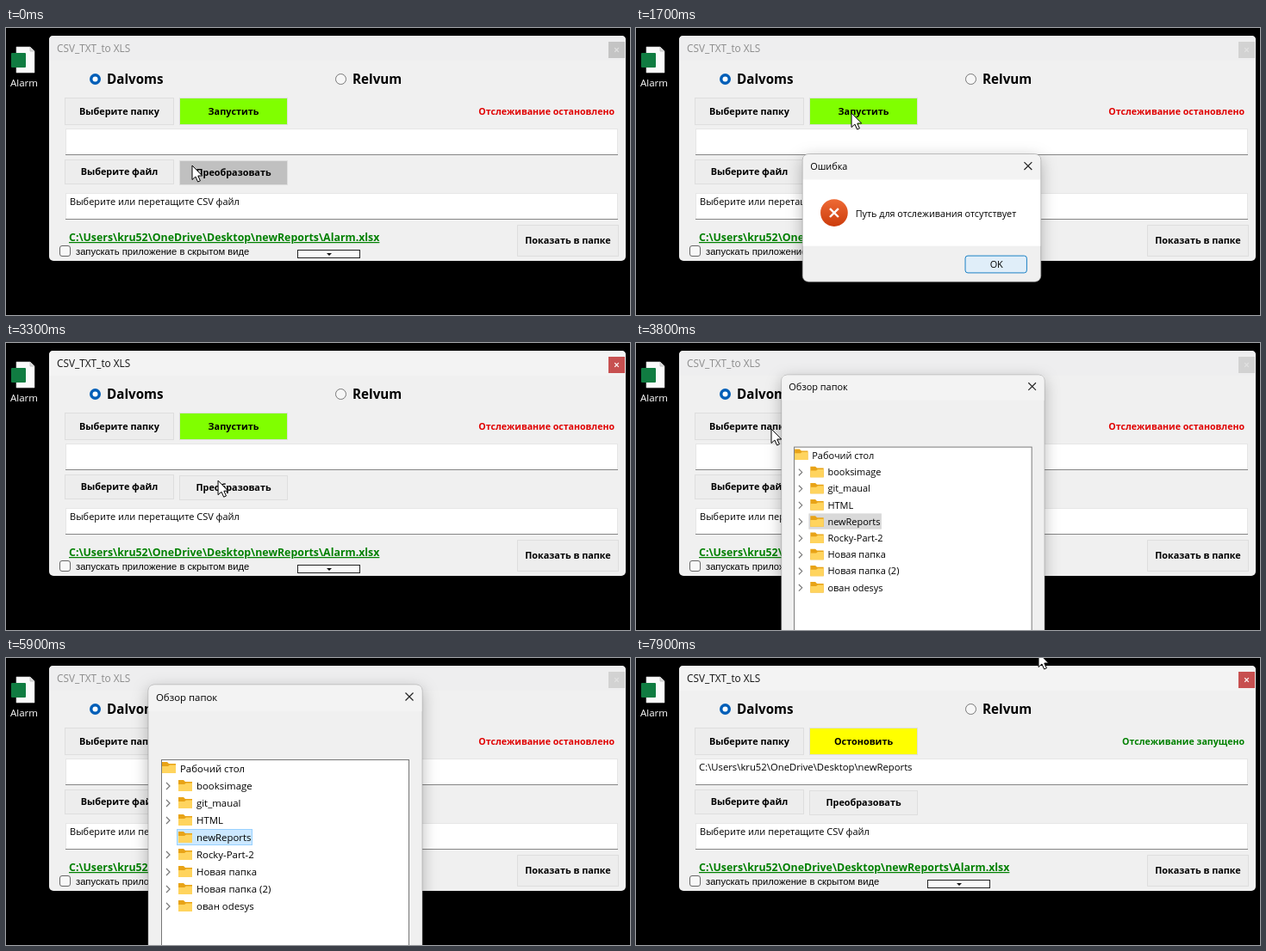
Write an HTML page that moves like this. It is 724 px wide and 334 px high and loops after 8000 ms.

```html
<!DOCTYPE html>
<html lang="ru">
<head>
<meta charset="utf-8">
<style>
html, body { margin: 0; width: 100%; height: 100%; overflow: hidden; background: #000; }
svg { display: block; font-family: "Open Sans", "Noto Sans", sans-serif; white-space: pre; }
.b { font-weight: 700; }
.m { text-anchor: middle; }
.e { text-anchor: end; }
.plain { font-family: "Liberation Sans", sans-serif; }
#error, #browse { filter: drop-shadow(0 5px 9px #0004); }
#tip { filter: drop-shadow(2px 2px 1px #0006); }
</style>
</head>
<body>
<svg id="stage" width="724" height="334" viewBox="0 0 724 334"></svg>
<script>
const stage = document.getElementById('stage');
const rect = (x, y, w, h, fill, stroke = 'none', extra = '') =>
  `<rect x="${x}" y="${y}" width="${w}" height="${h}" fill="${fill}" stroke="${stroke}" ${extra}/>`;
const text = (x, y, str, size = 11, cls = '', fill = '#000', extra = '') =>
  `<text x="${x}" y="${y}" font-size="${size}" class="${cls}" fill="${fill}" ${extra}>${str}</text>`;
const path = (d, stroke, width = 1, fill = 'none', extra = '') =>
  `<path d="${d}" stroke="${stroke}" stroke-width="${width}" fill="${fill}" ${extra}/>`;
const button = (x, y, w, h, label, fill = '#ededed', id = '') =>
  rect(x + .5, y + .5, w - 1, h - 1, fill, '#dedede', id && `id="${id}"`) +
  text(x + w / 2, y + h / 2 + 3.6, label, 10.85, 'b m', '#000', id && `id="${id}Text"`);
const field = (y, content) =>
  rect(69.5, y + .5, 640, 30, '#fff', '#e6e6e6') + path(`M69 ${y + 30.5}H710`, '#858585') + content;
const cross = (x, y, r, color, width, extra) =>
  path(`M${x - r} ${y - r}l${2 * r} ${2 * r}m0 ${-2 * r}l${-2 * r} ${2 * r}`, color, width, 'none', extra);
const folder = (x, y) =>
  path(`M${x} ${y}h6l2 2h8v11h-16z`, 'none', 0, '#e8a317') +
  path(`M${x} ${y + 5}h7l2-1.5h7v9.5h-16z`, 'none', 0, '#ffd45e');

const home = 'C:\\Users\\kru52\\OneDrive\\Desktop\\newReports';

const desktop =
  path('M12 22h16l5 5v25h-21z', '#d4d4d4', .6, '#fafafa') + path('M28 22v5h5', '#bbb', .8, '#ddd') +
  rect(6, 29, 17, 17, '#107c41', 'none', 'rx="1"') +
  text(21, 68, 'Alarm', 11.5, 'm', '#fff');

const app =
  rect(50, 9, 669, 262, '#f0f0f0', 'none', 'rx="5"') +
  path('M50 38V14q0-5 5-5H714q5 0 5 5V38z', 'none', 0, '#f0f0f0', 'id="bar"') +
  text(59, 28, 'CSV_TXT_to XLS', 11.8, '', '#111', 'id="title"') +
  rect(699, 16, 19, 19, '#c75050', 'none', 'id="close"') +
  cross(708.5, 25.5, 2.3, '#fff', 1.2, 'id="closeMark"') +
  '<circle cx="103.5" cy="59.5" r="6.5" fill="#005fb8"/><circle cx="103.5" cy="59.5" r="3" fill="#fff"/>' +
  '<circle cx="388.5" cy="59.5" r="6" fill="#f6f6f6" stroke="#777"/>' +
  text(117, 65, 'Dalvoms', 15.2, 'b') + text(402, 65, 'Relvum', 15.2, 'b') +
  button(68, 81, 127, 32, 'Выберите папку') +
  button(201, 81, 126, 32, 'Запустить', '#80ff00', 'start') +
  text(706, 101, '', 10.6, 'b e', '#e00000', 'id="status"') +
  field(117, text(73, 131, home, 11.3, '', '#000', 'id="watched"')) +
  button(68, 153, 127, 29, 'Выберите файл') +
  button(201, 154, 126, 29, 'Преобразовать', '#ededed', 'convert') +
  field(192, text(74, 206, 'Выберите или перетащите CSV файл')) +
  text(73, 248, home + '\\Alarm.xlsx', 12.37, 'b', '#008000', 'text-decoration="underline"') +
  rect(62.5, 253.5, 12, 12, '#f8f8f8', '#666', 'rx="2.5"') +
  text(81, 264, 'запускать приложение в скрытом виде', 11.2, 'plain') +
  rect(338.5, 258.5, 72, 9, '#fafafa', '#222') + path('M372 262h6l-3 3z', 'none', 0, '#111') +
  button(593, 229, 118, 37, 'Показать в папке');

const errorBox = `<g id="error">
  ${rect(192, 146, 279, 150, '#f0f0f0', '#9b9b9b', 'rx="7" stroke-width=".7"')}
  ${path('M192.5 176V153q0-6.5 6.5-6.5H464q6.5 0 6.5 6.5V176z', 'none', 0, '#f3f3f3')}
  ${rect(192.5, 176, 278, 78, '#fff')}
  ${text(201, 165, 'Ошибка')}${cross(456, 160, 4.5, '#222', 1.2)}
  <linearGradient id="red" x2="0" y2="1"><stop stop-color="#ee6a35"/><stop offset="1" stop-color="#cc3c0c"/></linearGradient>
  <circle cx="229" cy="215" r="16" fill="url(#red)"/>${cross(229, 215, 5, '#fff', 2.4)}
  ${text(254, 220, 'Путь для отслеживания отсутствует', 10.9)}
  ${rect(382.5, 265.5, 72, 20, '#e0eef9', '#1a80c4', 'rx="3"')}
  ${text(419, 280, 'OK', 11, 'm')}</g>`;

const names = ['booksimage', 'git_maual', 'HTML', 'newReports', 'Rocky-Part-2', 'Новая папка', 'Новая папка (2)', 'ован odesys'];
const rows = names.map((name, i) => {
  const y = 149 + 20 * i;
  const picked = i === 3;
  return (picked ? rect(198.5, y - 9.5, 87, 18, '#cce8ff', '#99d1ff', 'id="picked"') : '') +
    path(`M186 ${y - 4}l4 4l-4 4`, '#777', 1.2, 'none', picked ? 'id="arrow"' : '') +
    folder(200, y - 7) + text(221, y + 4, name, 11.4);
}).join('');
const browser = `<g id="browse">
  ${rect(165, 31, 318, 400, '#f0f0f0', '#8c8c8c', 'rx="7" stroke-width=".5"')}
  ${path('M165.5 62V38q0-6.5 6.5-6.5H476q6.5 0 6.5 6.5V62z', 'none', 0, '#f3f3f3')}
  ${text(174, 50, 'Обзор папок', 11.4)}${cross(468, 45, 4.5, '#222', 1.2)}
  ${rect(180.5, 118.5, 287, 300, '#fff', '#777')}
  ${folder(181, 121)}${text(202, 132.5, 'Рабочий стол', 11.4)}${rows}</g>`;

const tip = `<g id="tip">${rect(266.5, 221.5, 312, 35, '#f9f9f7', '#b8b8b8')}
  ${text(272, 236, 'Дата создания: 14.12.2022 22:31', 11.4, '', '#575757')}
  ${text(272, 251, 'Состояние доступности: Доступно на этом устройстве', 11.4, '', '#575757')}</g>`;

const pointers =
  path('M0 0V16.5L3.9 13L6.6 19L9.4 17.8L6.8 12H11.7Z', '#000', 1, '#fff', 'id="pointer"') +
  path('M4 2a1.5 1.5 0 0 1 3 0V7l6 1.5q2 .7 1.8 3L14 17l-1.5 4.5H6L1 14q-1-2 1-2l2 1.5Z', '#000', 1, '#fff', 'id="hand"');

stage.innerHTML = desktop + app + errorBox + browser + tip + pointers;
const el = id => document.getElementById(id);
const set = (id, attrs) => { for (const key in attrs) el(id).setAttribute(key, attrs[key]); };
const show = (id, on) => set(id, { visibility: on ? 'visible' : 'hidden' });
const clamp = v => Math.max(0, Math.min(1, v));

// time, x, y of the mouse
const route = [
  [0, 216, 160], [600, 216, 160], [1100, 250, 99], [1900, 250, 99], [2600, 410, 271], [3000, 410, 271],
  [3500, 157, 100], [4000, 157, 100], [4400, 265.5, 204], [5300, 265.5, 204], [5500, 275, 262],
  [6500, 385, 330], [6800, 330, 275], [7100, 250, 99], [7400, 250, 99], [7600, 360, 46], [7900, 467, -6], [8000, 467, -6]
];
function mouse(t) {
  const i = route.findIndex(p => p[0] > t);
  const [t0, x0, y0] = route[i - 1], [t1, x1, y1] = route[i];
  const u = (t - t0) / (t1 - t0), k = u * u * (3 - 2 * u);
  return [x0 + (x1 - x0) * k, y0 + (y1 - y0) * k];
}

// Scales a dialog around (cx, cy) while it opens and closes.
function popup(id, t, from, to, cx, cy, opening) {
  const grow = 1 - (1 - clamp((t - from) / opening)) ** 2;
  const leave = clamp((t - to) / 200);
  const s = .92 + .08 * Math.min(grow, 1 - leave);
  show(id, t >= from && t < to + 200);
  set(id, {
    transform: `translate(${cx * (1 - s)} ${cy * (1 - s)}) scale(${s})`,
    opacity: clamp((t - from + 100) / 200) * (1 - leave)
  });
}

function render(t) {
  const active = (t >= 300 && t < 1500) || (t >= 3000 && t < 3700) || t >= 6200;
  const running = t >= 7300;
  const hover = (t >= 1000 && t < 1500) || (t >= 7000 && !running);
  set('bar', { fill: active ? '#f3f3f3' : '#eeeeef' });
  set('title', { fill: active ? '#111' : '#8b8b8b' });
  set('close', { fill: active ? '#c75050' : t < 300 ? '#c4c4c4' : '#d2d2d2' });
  set('closeMark', { stroke: active ? '#fff' : '#e2e2e2' });
  set('start', { fill: running ? '#ffff00' : hover ? '#ace678' : '#80ff00' });
  set('convert', { fill: t < 800 ? '#c0c0c0' : '#ededed' });
  set('status', { fill: running ? '#008000' : '#e00000' });
  el('startText').textContent = running ? 'Остоновить' : 'Запустить';
  el('status').textContent = 'Отслеживание ' + (running ? 'запущено' : 'остановлено');
  show('watched', t >= 6200);

  popup('error', t, 1500, 2900, 331, 221, 300);
  popup('browse', t, 3700, 6000, 258, 184, 340);
  const selected = t >= 4200;
  set('picked', { fill: selected ? '#cce8ff' : '#d9d9d9', stroke: selected ? '#99d1ff' : '#d9d9d9' });
  set('arrow', { opacity: t < 5600 ? 1 : 0 });
  show('tip', t >= 4600 && t < 5500);

  const [x, y] = mouse(t);
  const hand = t >= 4400 && t < 5400;
  const away = t >= 5600 && t < 6500;
  for (const id of ['pointer', 'hand']) set(id, { transform: `translate(${x} ${y})` });
  show('hand', hand);
  show('pointer', !hand && !away);
}

function tick(now) {
  render(Math.floor(now % 8000 / 100) * 100);
  requestAnimationFrame(tick);
}
render(0);
requestAnimationFrame(tick);
</script>
</body>
</html>
```
